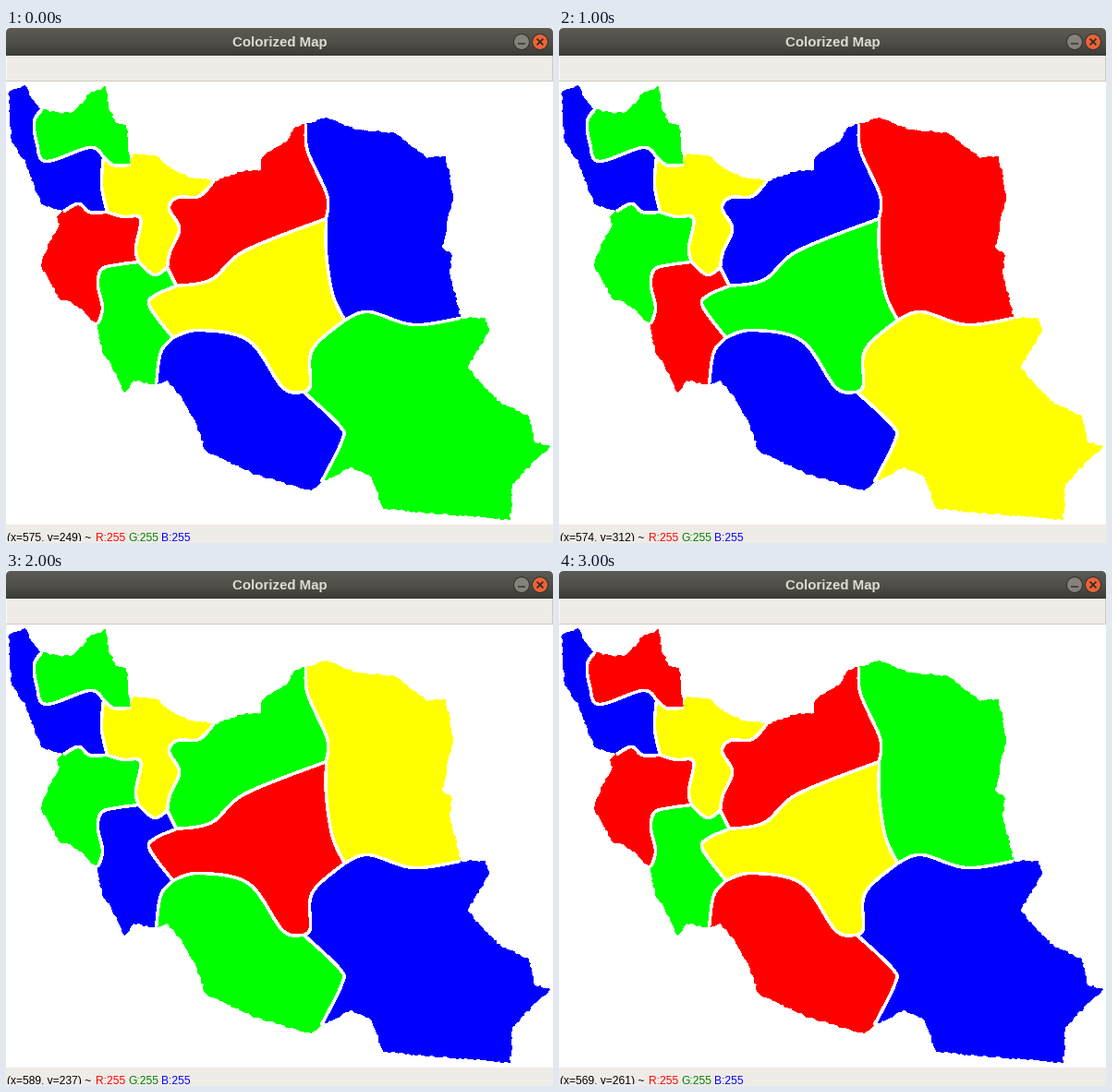
Recreate the animation shown at these times as a matplotlib script. Size 592 by 558 pixels, loop 3500 ms.

```python
import random

import numpy as np
import matplotlib.pyplot as plt
from matplotlib.animation import FuncAnimation
from matplotlib.colors import LinearSegmentedColormap
from matplotlib.patches import Circle, FancyBboxPatch, Polygon, Rectangle

W, H, DPI = 592, 558, 100
random.seed(7)

# Corners where regions A-J meet, named by the regions that touch there.
# Two letters mean a corner on the coast.
NODES = {"AB": (38, 88), "BC": (134, 148), "CD": (224, 166), "DE": (324, 104),
         "EJ": (491, 314), "IJ": (341, 491), "HI": (162, 385),
         "GH": (99, 320), "AG": (62, 198), "ABC": (105, 139),
         "ACG": (109, 199), "CGH": (143, 253), "CDH": (174, 259),
         "DFH": (184, 279), "FHI": (180, 335), "DEF": (346, 206),
         "EFJ": (366, 316), "FIJ": (322, 394)}

# One colouring of the ten regions and one pointer position per step
STEPS = [("BGYRBYRGBG", 575, 249), ("BGYBGYRGRB", 588, 242),
         ("BGYBRGGRBY", 574, 312), ("BGRYRGGBRB", 584, 253),
         ("BGYGYRGBGB", 589, 237), ("BRYRBGGBRY", 566, 272),
         ("BRYRGYRGRB", 569, 261)]
PAINT = {"R": "#ff0000", "G": "#00ff00", "B": "#0000ff", "Y": "#ffff00"}

arcs = []


def roughen(pts, step=3, shake=1.1):
    """Ragged coast: short straight pieces with shaken joints."""
    out = []
    for p, q in zip(pts, pts[1:]):
        n = max(1, round(np.hypot(*(q - p)) / step))
        for k in range(n):
            jolt = [random.uniform(-shake, shake) for _ in "xy"]
            out.append(p + (q - p) * k / n + (np.array(jolt) if k else 0))
    return np.array(out + [pts[-1]])


def smooth(pts, n=10):
    """Catmull-Rom curve through the points."""
    padded = np.vstack([pts[:1], pts, pts[-1:]])
    t = np.linspace(0, 1, n, endpoint=False)[:, None]
    out = []
    for a, b, c, d in zip(padded, padded[1:], padded[2:], padded[3:]):
        out.append(b + t / 2 * (c - a + t * (2 * a - 5 * b + 4 * c - d
                                             + t * (3 * (b - c) + d - a))))
    return np.vstack(out + [pts[-1:]])


def arc(start, end, *mids):
    """Join two corners; it belongs to the regions that both corners share."""
    owners = set(start) & set(end)
    pts = np.array([NODES[start], *mids, NODES[end]], float) + 0.5
    pts = roughen(pts) if len(owners) == 1 else smooth(pts)
    arcs.append((start, end, pts, owners))


def ring(region):
    """Chain all arcs of one region into a closed outline."""
    left = [a[:3] for a in arcs if region in a[3]]
    _, here, outline = left.pop()
    while left:
        step = next(a for a in left if here in a[:2])
        left = [a for a in left if a is not step]
        start, end, pts = step
        if here == end:
            start, end, pts = end, start, pts[::-1]
        outline = np.vstack([outline, pts])
        here = end
    return outline


# Coasts
arc("AG", "AB", (38, 190), (21, 145), (6, 122), (3, 69), (20, 62), (28, 78))
arc("AB", "BC", (60, 93), (74, 90), (90, 71), (107, 63), (110, 84),
    (117, 102), (129, 105))
arc("BC", "CD", (138, 136), (164, 139), (173, 150), (200, 162))
arc("CD", "DE", (260, 154), (276, 154), (277, 140), (305, 121), (314, 107))
arc("DE", "EJ", (346, 97), (375, 109), (420, 114), (455, 141), (475, 139),
    (483, 180), (471, 238), (482, 246), (479, 264))
arc("EJ", "IJ", (518, 314), (522, 327), (498, 368), (535, 407), (565, 420),
    (571, 449), (588, 453), (571, 468), (547, 494), (545, 532), (408, 520),
    (395, 485), (372, 475))
arc("IJ", "HI", (330, 500), (270, 483), (216, 457), (206, 428), (191, 402),
    (174, 380))
arc("HI", "GH", (137, 381), (128, 394), (113, 362), (104, 350))
arc("GH", "AG", (70, 295), (58, 293), (38, 256), (47, 232), (58, 212),
    (55, 204))

# Inner borders
arc("AB", "ABC", (30, 101), (33, 125), (43, 144), (90, 129))
arc("ABC", "BC", (116, 148))
arc("ABC", "ACG", (103, 170))
arc("AG", "ACG", (78, 190), (90, 199))
arc("ACG", "CGH", (126, 204), (145, 206), (140, 238))
arc("CGH", "GH", (120, 256), (103, 261), (99, 278), (104, 303))
arc("CGH", "CDH", (160, 267))
arc("CD", "CDH", (208, 182), (185, 183), (176, 195), (187, 217), (177, 242))
arc("CDH", "DFH")
arc("DFH", "FHI", (161, 289), (155, 301))
arc("FHI", "HI", (167, 351))
arc("DFH", "DEF", (222, 272), (258, 241))
arc("DE", "DEF", (326, 133), (347, 181))
arc("DEF", "EFJ", (346, 243), (353, 288))
arc("EFJ", "EJ", (392, 307), (440, 321))
arc("EFJ", "FIJ", (331, 348), (329, 386))
arc("FHI", "FIJ", (208, 327), (262, 338), (299, 389))
arc("FIJ", "IJ", (361, 431), (363, 447))

fig = plt.figure(figsize=(W / DPI, H / DPI), dpi=DPI, facecolor="white")
ax = fig.add_axes([0, 0, 1, 1])


def box(x, y, w, h, color, z=1):
    ax.add_patch(Rectangle((x, y), w, h, fc=color, lw=0, aa=False, zorder=z))


def label(x, y, text, px, color, weight="normal", align="left"):
    return ax.text(x, y, text, fontsize=px * 72 / DPI, color=color, ha=align,
                   va="baseline", family="Liberation Sans", weight=weight,
                   zorder=6)


def stroke(xs, ys, color, px, z, smooth_edge=True):
    ax.plot(xs, ys, color=color, lw=px * 72 / DPI, zorder=z, aa=smooth_edge,
            solid_capstyle="butt", solid_joinstyle="round")


def draw_window():
    shades = LinearSegmentedColormap.from_list(
        "bar", ["#5b5a53", "#504f49", "#3c3b37"])
    bar = ax.imshow(np.linspace(0, 1, 30)[:, None], cmap=shades, zorder=2,
                    extent=(0, W, 30, 0), aspect="auto")
    frame = FancyBboxPatch((5, 5), W - 10, 60, fc="none", ec="none",
                           boxstyle="round,pad=5,rounding_size=5")
    ax.add_patch(frame)
    bar.set_clip_path(frame)
    label(296, 20, "Colorized Map", 15, "#dfdbd2", "bold", "center")

    for x, fill in ((558, "#84827b"), (578, "#ec6337")):
        ax.add_patch(Circle((x, 15), 8.5, fc=fill, ec="#35342f", lw=0.8,
                            zorder=3))
    stroke([554, 562], [16.5, 16.5], "#3a3934", 1.6, 4)
    for dy in (-3.4, 3.4):
        stroke([574.6, 581.4], [15 - dy, 15 + dy], "#3a2a22", 1.8, 4)

    # Tool bar with a light and a dark edge, then the status bar
    box(0, 30, W, 28, "#cfcac4")
    box(0, 30, W - 1, 27, "#fbfaf9")
    box(1, 31, W - 2, 26, "#efebe7")
    box(0, 538, W, 20, "#efebe7")
    box(0, 556, W, 2, "#efebe7", 7)


draw_window()
regions = [ax.add_patch(Polygon(ring(r), lw=0, aa=False, zorder=2))
           for r in "ABCDEFGHIJ"]
for _, _, pts, owners in arcs:
    if len(owners) == 2:
        stroke(*pts.T, "white", 2.4, 3, smooth_edge=False)

pointer = label(1, 556, "", 12, "black")
for x, text, color in ((97, "R:255", "#ff0000"), (132, "G:255", "#008000"),
                       (168, "B:255", "#0000ff")):
    label(x, 556, text, 12, color)

ax.set_xlim(0, W)
ax.set_ylim(H, 0)
ax.axis("off")


def update(i):
    colors, x, y = STEPS[i]
    for region, key in zip(regions, colors):
        region.set_facecolor(PAINT[key])
    pointer.set_text(f"(x={x}, y={y}) ~")
    return [*regions, pointer]


anim = FuncAnimation(fig, update, frames=len(STEPS), interval=500,
                     repeat=True, repeat_delay=0, blit=False)
plt.show()
```
